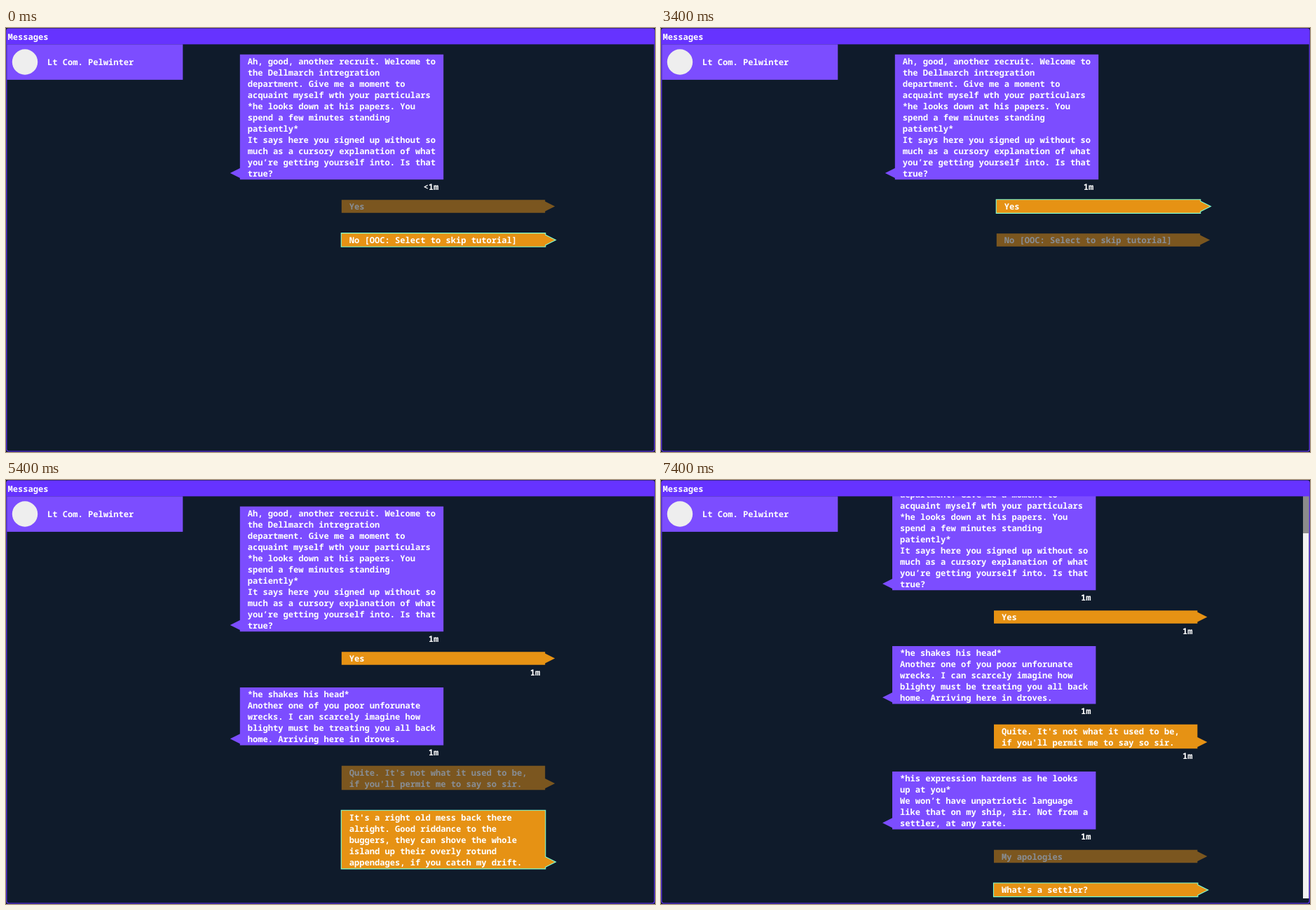
An HTML page for the animation above (8000 ms loop, 926 px wide and 605 px high).

```html
<!DOCTYPE html>
<html lang="en">
<head>
<meta charset="utf-8">
<title>Messages</title>
<style>
  html, body { margin: 0; width: 100%; height: 100%; overflow: hidden; background: #0f1b2b; }
  svg { display: block; }
  text {
    font: 600 12.08px "Noto Sans Mono", "DejaVu Sans Mono", monospace;
    fill: #fff; white-space: pre; text-rendering: geometricPrecision;
  }
  .npc { fill: #7c4dff; }
  .me { fill: #e69214; }
  .dim { opacity: .5; }
  .picked .me { stroke: #7fffd4; stroke-width: 2.2; paint-order: stroke; }
</style>
</head>
<body>
<svg width="926" height="605" viewBox="0 0 926 605">
  <clipPath id="view"><rect y="23" width="926" height="575"/></clipPath>
  <rect width="926" height="605" fill="#0f1b2b"/>
  <g clip-path="url(#view)"><g id="chat"></g></g>
  <g id="bar">
    <rect x="916" y="23" width="8.5" height="574" fill="#f1f1f1"/>
    <rect x="916" y="23" width="8.5" height="53" fill="#8b8b8b"/>
  </g>
  <rect x=".8" y="1" width="924.4" height="603" rx="3" fill="none" stroke="#6633ff" stroke-width="1.1"/>
  <rect x="1" y="1" width="924" height="22.3" fill="#6633ff"/>
  <text x="2.5" y="16.8">Messages</text>
  <rect x="1.3" y="23.3" width="251" height="50.6" class="npc"/>
  <circle cx="27" cy="48.5" r="18.2" fill="#eee"/>
  <text x="59" y="52.8">Lt Com. Pelwinter</text>
</svg>
<script>
const LOOP = 8000, LINE = 16, WIDTH = 290.4;
const chat = document.getElementById('chat'), bar = document.getElementById('bar');

const greeting = `Ah, good, another recruit. Welcome to
the Dellmarch intregration
department. Give me a moment to
acquaint myself wth your particulars
*he looks down at his papers. You
spend a few minutes standing
patiently*
It says here you signed up without so
much as a cursory explanation of what
you’re getting yourself into. Is that
true?`;
const sigh = `*he shakes his head*
Another one of you poor unforunate
wrecks. I can scarcely imagine how
blighty must be treating you all back
home. Arriving here in droves.`;
const quite = `Quite. It's not what it used to be,
if you'll permit me to say so sir.`;
const mess = `It's a right old mess back there
alright. Good riddance to the
buggers, they can shove the whole
island up their overly rotund
appendages, if you catch my drift.`;
const rebuke = `*his expression hardens as he looks
up at you*
We won’t have unpatriotic language
like that on my ship, sir. Not from a
settler, at any rate.`;

const escape = s => s.replace(/</g, '&lt;');

function bubble(who, top, words, { age = '', state = '' } = {}) {
  const lines = words.split('\n');
  const left = who === 'npc' ? 333.8 : 478.8, right = left + WIDTH;
  const bottom = top + lines.length * LINE + 2.5;
  const mid = bottom - 9.2;
  const shape = who === 'npc'
    ? `M${left} ${top}H${right}V${bottom}H${left}V${mid + 7}l-14 -7 14 -7Z`
    : `M${left} ${top}H${right}V${mid - 7}l14 7 -14 7V${bottom}H${left}Z`;
  const rows = lines.map((s, i) =>
    `<text x="${left + 11}" y="${top + 13.8 + i * LINE}">${s}</text>`).join('');
  const stamp = `<text x="${right - 7}" y="${bottom + 14.9}" text-anchor="end">${escape(age)}</text>`;
  return `<g class="${state}"><path class="${who}" d="${shape}"/>${rows}${stamp}</g>`;
}

const said = (who, top, words, age = '1m') => bubble(who, top, words, { age });
const choices = (selected, ...options) => options.map(([top, words], i) =>
  bubble('me', top, words, { state: i === selected ? 'picked' : 'dim' })).join('');

const opening = (age, selected) => said('npc', 37.8, greeting, age) +
  choices(selected, [245.3, 'Yes'], [293.2, 'No [OOC: Select to skip tutorial]']);
const answered = said('npc', 37.8, greeting) + said('me', 245.3, 'Yes') + said('npc', 296, sigh);
const second = selected => answered + choices(selected, [407.8, quite], [471.8, mess]);
const third = answered + said('me', 407.8, quite) + said('npc', 474.9, rebuke) +
  choices(1, [586.7, 'My apologies'], [634.6, "What's a settler?"]);

// start time and chat contents
const scenes = [
  [0, opening('<1m', 1)],
  [2500, opening('1m', 0)],
  [3200, opening('1m', 1)],
  [3400, opening('1m', 0)],
  [3800, second(1)],
  [4500, second(0)],
  [5300, second(1)],
  [6300, second(0)],
  [7300, third],
];

let shown;
function draw(now) {
  const t = now % LOOP;
  const scene = scenes.findLast(([start]) => t >= start);
  if (scene !== shown) {
    shown = scene;
    const scrolled = scene[1] === third;
    chat.innerHTML = scene[1];
    chat.setAttribute('transform', scrolled ? 'translate(-3.8 -59)' : '');
    bar.style.display = scrolled ? '' : 'none';
  }
}

const begin = performance.now();
(function tick() {
  draw(performance.now() - begin);
  requestAnimationFrame(tick);
})();
</script>
</body>
</html>
```
